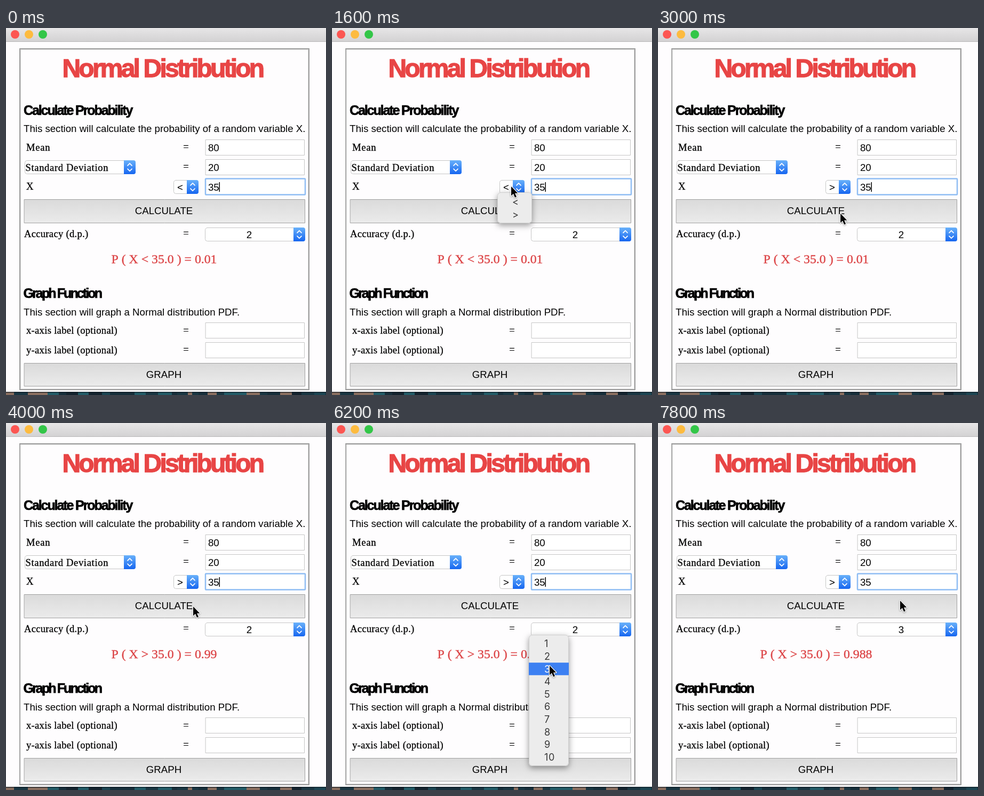
An HTML page with a canvas that plays this animation: 600 px wide and 688 px high, repeating every 8000 ms.

```html
<!DOCTYPE html>
<html lang="en">
<head>
<meta charset="utf-8">
<title>Normal Distribution</title>
<style>
  html, body { margin: 0; width: 100%; height: 100%; overflow: hidden; background: #fefdfe; }
  canvas { display: block; }
</style>
</head>
<body>
<canvas id="stage" width="600" height="688"></canvas>
<script>
const ctx = document.getElementById('stage').getContext('2d');
const LOOP = 8000, STEP = 200;
const SANS = '18.65px "Liberation Sans", Arial, sans-serif';
const SERIF = '18.5px "Liberation Serif", Times, serif';
const RESULT = '23.8px "Liberation Serif", Times, serif';
const MENU = '18px Inter, sans-serif';
const heavy = size => `bold ${size}px "Liberation Sans", Arial, sans-serif`;

// Pointer stops: time, x, y
const POINTER = [
  [400, 600, 10], [1000, 336, 297], [1600, 336, 297], [2200, 339, 349],
  [2800, 339, 349], [3400, 351, 344], [4200, 351, 344], [5000, 408, 382],
  [5400, 408, 382], [6000, 408, 455], [6200, 408, 455], [6600, 447, 325],
  [7200, 454, 333]
];

const SIGN_MENU = {
  x: 310, y: 308, w: 65, h: 58, first: 313, pitch: 24, textX: 338,
  items: ['<', '>'], picked: 1, open: 1600, pick: 2400, close: 2600
};
const PLACES_MENU = {
  x: 369, y: 397, w: 75, h: 246, first: 402, pitch: 23.6, textX: 398,
  items: Array.from({ length: 10 }, (_, i) => String(i + 1)),
  picked: 2, open: 5200, pick: 6000, close: 6600
};

// "bold" is the width of an outline that thickens the strokes.
function text(str, x, y, font = SANS, { color = '#000', align = 'left', spacing = 0, bold = 0 } = {}) {
  ctx.font = font;
  ctx.fillStyle = ctx.strokeStyle = color;
  ctx.textAlign = align;
  ctx.letterSpacing = spacing + 'px';
  ctx.fillText(str, x, y);
  if (!bold) return;
  ctx.lineWidth = bold;
  ctx.lineJoin = 'miter';
  ctx.strokeText(str, x, y);
}

const label = (str, x, y, spacing = .33) => text(str, x, y, SERIF, { spacing, bold: .3 });

function gradient(x0, y0, x1, y1, colors) {
  const g = ctx.createLinearGradient(x0, y0, x1, y1);
  colors.forEach((c, i) => g.addColorStop(i / (colors.length - 1), c));
  return g;
}

function box(x, y, w, h, fill, stroke, radius = 0, line = 1) {
  ctx.beginPath();
  ctx.roundRect(x, y, w, h, radius);
  if (fill) { ctx.fillStyle = fill; ctx.fill(); }
  if (stroke) { ctx.strokeStyle = stroke; ctx.lineWidth = line; ctx.stroke(); }
}

function field(y, value = '') {
  box(374.5, y + .5, 185, 29, '#fff', '#c5c5c5');
  text(value, 379, y + 22);
}

function button(y, h, caption) {
  box(34.5, y + .5, 526, h, gradient(0, y, 0, y + h, ['#dadada', '#ebebeb']), '#a0a0a0');
  text(caption, 296, y + 27.5, SANS, { align: 'center' });
}

function select(x, y, w) {
  const right = x + w, mid = right - 11;
  box(x + .5, y + .5, w - 1, 25, '#fff', '#c6c6c6', 4);
  box(right - 22, y, 22, 26, gradient(0, y, 0, y + 26, ['#69b1fa', '#1666f0']), null, [0, 4, 4, 0]);
  ctx.strokeStyle = '#fff';
  ctx.lineWidth = 1.8;
  ctx.lineCap = ctx.lineJoin = 'round';
  ctx.beginPath();
  for (const dir of [-1, 1]) {
    const base = y + 13 + dir * 3.2;
    ctx.moveTo(mid - 4, base);
    ctx.lineTo(mid, base + dir * 4);
    ctx.lineTo(mid + 4, base);
  }
  ctx.stroke();
}

// Strip of desktop below the window
function drawDesktop() {
  const tones = ['#14232e', '#1c4653', '#172f3b', '#235c68', '#1a3743', '#8b6f60'];
  let seed = 11;
  for (let x = 0; x < 600;) {
    seed = seed * 16807 % 2147483647;
    const w = 8 + seed % 19;
    ctx.fillStyle = tones[seed % tones.length];
    ctx.fillRect(x, 682, w, 6);
    x += w;
  }
  ctx.fillStyle = 'rgba(16,28,36,.6)';
  ctx.fillRect(0, 682, 600, 2);
}

function drawWindow() {
  ctx.fillStyle = '#fefdfe';
  ctx.fillRect(0, 0, 600, 688);
  ctx.fillStyle = gradient(0, 0, 0, 25, ['#e7e6e7', '#d3d2d3']);
  ctx.fillRect(0, 0, 600, 25);
  ctx.fillStyle = '#b9b8b9';
  ctx.fillRect(0, 25, 600, 1);
  ['#fc5652', '#fdbb3f', '#33c648'].forEach((c, i) => {
    ctx.beginPath();
    ctx.arc(17 + 26 * i, 12, 8, 0, 7);
    ctx.fillStyle = c;
    ctx.fill();
  });
  drawDesktop();
  box(26, 39, 542, 639, null, '#9c9c9c', 0, 2);
  box(27.5, 40.5, 539, 636, null, '#dcdcdc');
}

function drawForm(sign, places, result, caret) {
  text('Normal Distribution', 105.5, 92, heavy(48), { color: '#e84545', spacing: -3.8, bold: 1.3 });
  text('Calculate Probability', 33, 162.5, heavy(25), { spacing: -2.1, bold: .7 });
  text('This section will calculate the probability of a random variable X.', 33, 195);
  text('Graph Function', 32.5, 505.5, heavy(25), { spacing: -2.9, bold: .7 });
  text('This section will graph a Normal distribution PDF.', 33, 539);

  select(35, 248, 208);
  select(314, 285, 47);
  select(373, 374, 188);
  label('Mean', 38, 229.5, .8);
  label('Standard Deviation', 36.5, 267.5, .68);
  label('X', 38, 303);
  label('Accuracy (d.p.)', 34, 392);
  label('x-axis label (optional)', 38, 573);
  label('y-axis label (optional)', 38, 609.5);
  for (const y of [229, 266, 391, 573, 609]) label('=', 332.3, y);

  field(209, '80');
  field(246, '20');
  field(552);
  field(589);
  box(374, 282.5, 187, 30, '#fff', '#8fbdf3', 1, 2.5);
  text('35', 379, 304.5);
  if (caret) {
    ctx.fillStyle = '#000';
    ctx.fillRect(399.5, 289, 1.5, 18);
  }
  text(sign, 321, 304.5);
  text(places, 456, 393.5, SANS, { align: 'center' });

  button(321, 44, 'CALCULATE');
  button(628, 43, 'GRAPH');
  text(result, 296.5, 441, RESULT, { color: '#dc4547', align: 'center', bold: .4 });
}

function drawMenu(m, t, pointer) {
  if (t < m.open || t >= m.close + STEP) return;
  const fading = t >= m.close;
  const hovered = t >= m.pick ? m.picked : Math.floor((pointer.y - m.first) / m.pitch);
  ctx.save();
  ctx.globalAlpha = fading ? .4 : 1;
  if (!fading) {
    ctx.shadowColor = 'rgba(0,0,0,.4)';
    ctx.shadowBlur = 12;
    ctx.shadowOffsetY = 4;
  }
  box(m.x, m.y, m.w, m.h, '#ececec', null, 6);
  ctx.shadowColor = 'transparent';
  box(m.x + .5, m.y + .5, m.w - 1, m.h - 1, null, '#cfcfcf', 6);
  m.items.forEach((item, i) => {
    const top = m.first + i * m.pitch;
    if (i === hovered) box(m.x, top, m.w, m.pitch, '#3c80f2');
    text(item, m.textX, top + m.pitch / 2 + 6.5, MENU,
      { color: i === hovered ? '#fff' : '#383838', spacing: .6 });
  });
  ctx.restore();
}

function pointerAt(t) {
  const next = POINTER.findIndex(p => p[0] > t);
  const [, lastX, lastY] = POINTER[POINTER.length - 1];
  if (next < 0) return { x: lastX, y: lastY };
  const [t0, x0, y0] = POINTER[Math.max(0, next - 1)];
  const [t1, x1, y1] = POINTER[next];
  const u = Math.max(0, (t - t0) / (t1 - t0 || 1));
  const e = u * u * (3 - 2 * u);
  return { x: x0 + (x1 - x0) * e, y: y0 + (y1 - y0) * e };
}

const ARROW = new Path2D('M0 0V17.5L4 13.8L7 20.8L10 19.5L7 12.7H12.3Z');
function drawPointer({ x, y }) {
  ctx.save();
  ctx.translate(x, y);
  ctx.lineJoin = 'round';
  ctx.lineWidth = 2.4;
  ctx.strokeStyle = '#fff';
  ctx.shadowColor = 'rgba(0,0,0,.35)';
  ctx.shadowBlur = 3;
  ctx.shadowOffsetY = 1;
  ctx.stroke(ARROW);
  ctx.shadowColor = 'transparent';
  ctx.fillStyle = '#000';
  ctx.fill(ARROW);
  ctx.restore();
}

function draw(now) {
  const t = Math.floor(now % LOOP / STEP) * STEP;
  const pointer = pointerAt(t);
  const sign = t < 2600 ? '<' : '>';
  const places = t < 6800 ? '2' : '3';
  const result = t < 3600 ? 'P ( X < 35.0 ) = 0.01'
    : t < 7600 ? 'P ( X > 35.0 ) = 0.99' : 'P ( X > 35.0 ) = 0.988';
  drawWindow();
  drawForm(sign, places, result, t % 1000 < 700);
  drawMenu(SIGN_MENU, t, pointer);
  drawMenu(PLACES_MENU, t, pointer);
  if (t >= POINTER[0][0]) drawPointer(pointer);
  requestAnimationFrame(draw);
}
requestAnimationFrame(draw);
</script>
</body>
</html>
```
